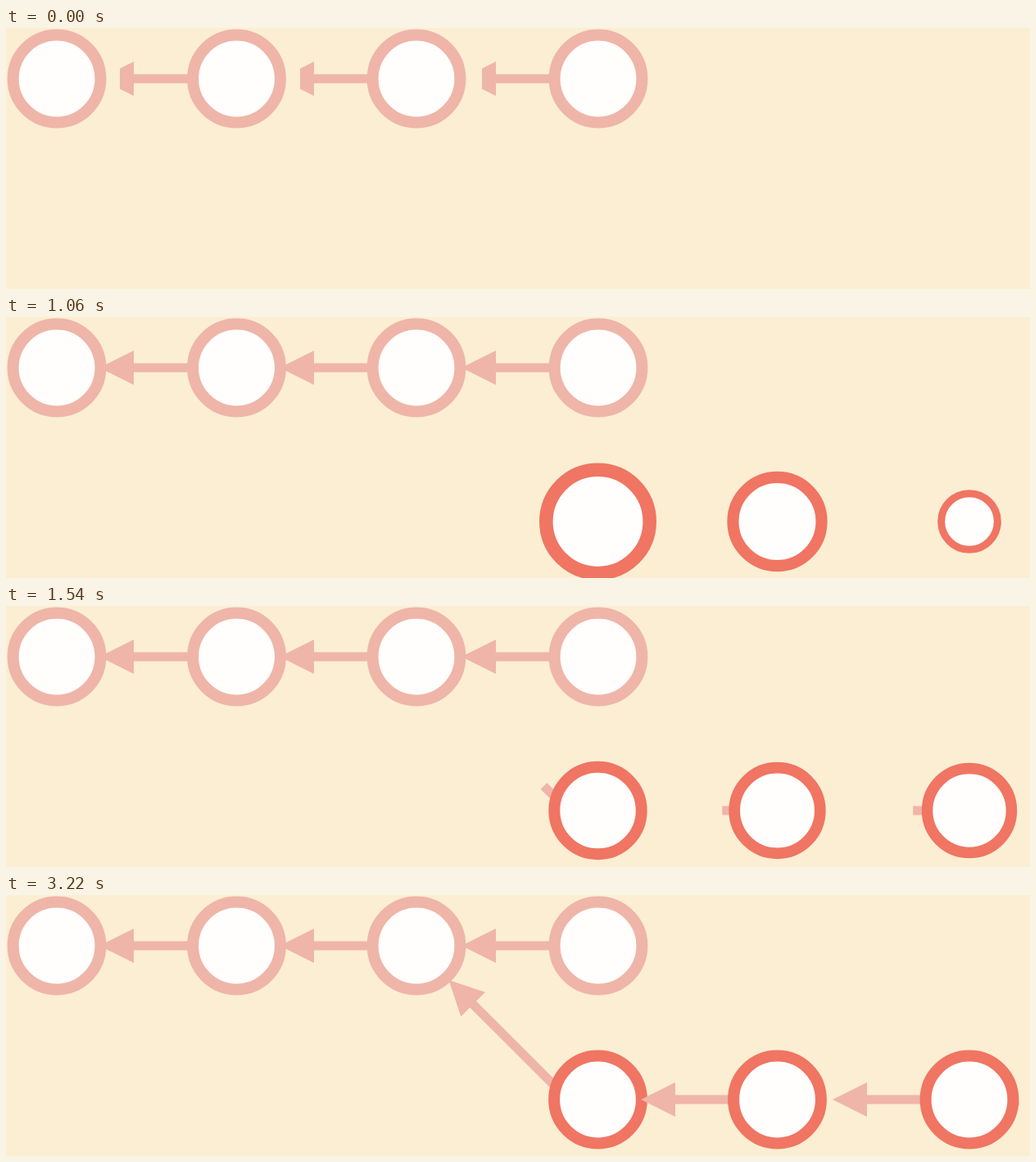
These frames come from a looping animation (1250x319 px, 3.32 s). An HTML page with a canvas:

```html
<!DOCTYPE html>
<html lang="en">
<head>
<meta charset="utf-8">
<title>Branching commits</title>
<style>
  html, body { margin: 0; width: 100%; height: 100%; overflow: hidden; background: #fbeed3; }
  canvas { display: block; width: 1250px; height: 319px; }
</style>
</head>
<body>
<canvas id="stage" width="1250" height="319"></canvas>
<script>
const ctx = document.getElementById('stage').getContext('2d');
const LOOP = 3320, STEP = 20;
const PAPER = '#fbeed3', WHITE = '#fffefd', PALE = '#efb5a8', RED = '#f07563';
const HEAD = 42, HALF_HEAD = 21, HALF_STEM = 5.5;
const ARROW_LENGTH = 107, BRANCH_LENGTH = 178;
const POP_START = 808, POP_STAGGER = 65, POP_PEAK = 283;

// Underdamped spring: 20 % overshoot, reached POP_PEAK ms after the start.
function spring(ms) {
  if (ms <= 0) return 0;
  const x = ms / POP_PEAK;
  return 1 - Math.exp(-1.609 * x) * (Math.cos(Math.PI * x) + 0.512 * Math.sin(Math.PI * x));
}

// Share of an arrow still hidden: a quick reveal, then a slow finish.
function hidden(t) {
  if (t < 1518) return 1;
  if (t < 1840) {
    const left = (1840 - t) / 322;
    return 0.29 + 0.25 * left + 0.46 * left * left;
  }
  return t < 2540 ? 0.29 * ((2540 - t) / 700) ** 1.8 : 0;
}

function circle(x, y, color, scale = 1) {
  if (scale <= 0) return;
  ctx.beginPath();
  ctx.arc(x, y, 53.4 * scale, 0, 2 * Math.PI);
  ctx.fillStyle = WHITE;
  ctx.fill();
  ctx.lineWidth = 14 * scale;
  ctx.strokeStyle = color;
  ctx.stroke();
}

// An arrow with its tip at (x, y); the first `cut` pixels from the tip are masked.
function arrow(x, y, length, cut, angle = 0) {
  if (cut >= length) return;
  ctx.save();
  ctx.translate(x, y);
  ctx.rotate(angle);
  ctx.beginPath();
  ctx.rect(cut, -30, length + 8 - cut, 60);
  ctx.clip();
  ctx.beginPath();
  ctx.moveTo(0, 0);
  ctx.lineTo(HEAD, -HALF_HEAD);
  ctx.lineTo(HEAD, HALF_HEAD);
  ctx.closePath();
  ctx.rect(HEAD - 0.5, -HALF_STEM, length + 8 - HEAD, 2 * HALF_STEM);
  ctx.fillStyle = PALE;
  ctx.fill();
  ctx.restore();
}

function draw(t) {
  ctx.fillStyle = PAPER;
  ctx.fillRect(0, 0, 1250, 319);

  const trunk = [62, 281.5, 501, 723], trunkTips = [114, 334, 556];
  const trunkCut = ARROW_LENGTH * hidden(t + 1960) ** 0.92;
  trunk.forEach((x, i) => {
    if (i === 3) arrow(540.5, 104, BRANCH_LENGTH, BRANCH_LENGTH * hidden(t), Math.PI / 4);
    circle(x, 62, PALE);
    if (i === 3) return;
    const rim = t < 800 ? x + 61.2 - trunkTips[i] : 0;
    arrow(trunkTips[i], 62, ARROW_LENGTH, Math.max(trunkCut, rim));
  });

  const branch = [722.5, 941.5, 1176], branchTips = [775, 1009], pace = [0.92, 1.064];
  branch.forEach((x, i) => {
    circle(x, 250, RED, spring(t - POP_START - i * POP_STAGGER));
    if (i < 2) arrow(branchTips[i], 250, ARROW_LENGTH, ARROW_LENGTH * hidden(t) ** pace[i]);
  });
}

const start = performance.now();
function tick() {
  const t = (performance.now() - start) % LOOP;
  draw(Math.floor(t / STEP) * STEP);
  requestAnimationFrame(tick);
}
tick();
</script>
</body>
</html>
```
